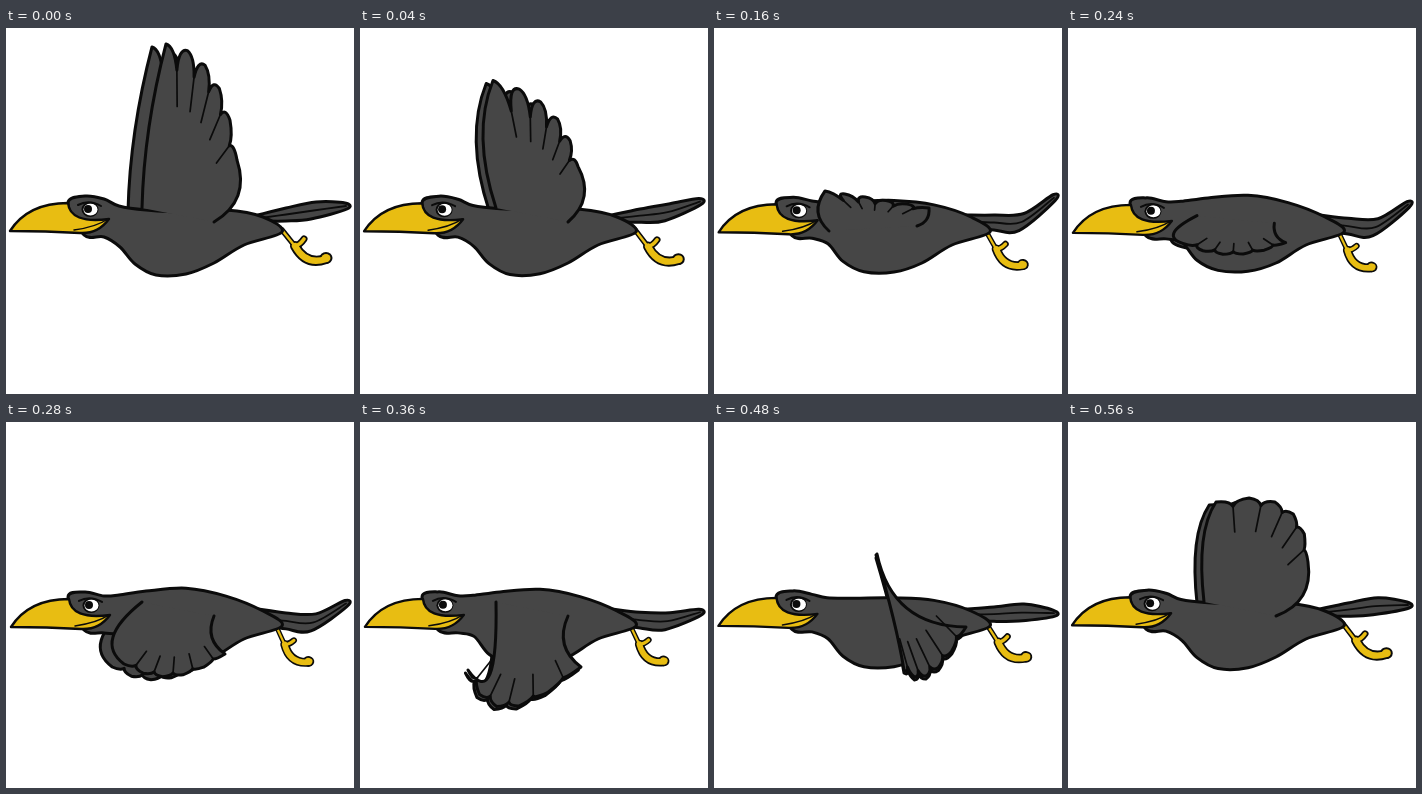
Recreate the animation shown at these times as an HTML page with a canvas. Size 348 by 366 pixels, loop 0.6 s.

```html
<!DOCTYPE html>
<html lang="en">
<head>
<meta charset="utf-8">
<title>Flying crow</title>
<style>
html, body { margin: 0; width: 100%; height: 100%; overflow: hidden; background: #fff; }
canvas { display: block; }
</style>
</head>
<body>
<canvas id="stage" width="348" height="366"></canvas>
<script>
const ctx = document.getElementById('stage').getContext('2d');
const STEPS = 15, STEP_MS = 40, FEATHERS = 6, TAU = 2 * Math.PI;
const PLUMAGE = '#464646', INK = '#0b0b0b', YELLOW = '#e8bd12';

// A wing runs front -> (lead) -> first tip -> (arch) -> last tip -> back.
const wingPose = (step, lead, first, arch, last, front = [136, 180], back = [208, 194]) =>
  ({ step, points: [front, lead, first, arch, last, back] });

const WING_POSES = [
  wingPose(0, [138, 100], [160, 16], [218, 22], [231, 132]),
  wingPose(2, [85, 112], [106, 89], [190, 115], [205, 145]),
  wingPose(4, [95, 185], [111, 163], [160, 170], [215, 180], [115, 203], [203, 198]),
  wingPose(7, [87, 219], [118, 242], [165, 272], [219, 232]),
  wingPose(9, [138, 290], [108, 248], [130, 325], [221, 245]),
  wingPose(10, [112, 270], [126, 340], [180, 385], [219, 285]),
  wingPose(12, [182, 200], [190, 248], [215, 275], [252, 205], [162, 133], [163, 132]),
  wingPose(13, [144, 130], [160, 101], [240, 95], [247, 180]),
  wingPose(14, [128, 110], [148, 80], [240, 60], [240, 140])
];

// x, y, and how far the point rises when the wings are down
const BODY = [
  [62, 175, 0], [79, 168, -2], [98, 171, -3], [113, 178, 5], [140, 182, 13], [180, 184, 18],
  [220, 182, 8], [257, 189, 0], [276, 204, 0], [238, 217, 0], [208, 235, 0], [180, 246, 3],
  [150, 247, 5], [129, 236, 4], [114, 219, 5], [98, 209, -2], [78, 207, -1]
];
const HEAD = {
  beak: new Path2D('M4 203Q22 175 62 175Q64 196 103 191Q92 206 74 205Q40 203 4 203Z'),
  mouth: new Path2D('M68 202Q90 199 102 191'),
  brow: new Path2D('M72 177Q83 171 95 178')
};
// Drawn from the hip
const LEG = {
  shin: new Path2D('M0 0L12 15'),
  claw: new Path2D('M13 16Q18 15 22 9'),
  foot: new Path2D('M13 16Q24 36 44 29')
};

const mix = (a, b, t) => a.map((v, i) => v + (b[i] - v) * t);

function alongQuad(a, c, b, t) {
  return mix(mix(a, c, t), mix(c, b, t), t);
}

// Smooth curve through the points.
function spline(points, closed = false) {
  const n = points.length, path = new Path2D();
  const at = i => points[closed ? (i + n) % n : Math.min(Math.max(i, 0), n - 1)];
  path.moveTo(...points[0]);
  for (let i = 0; i < (closed ? n : n - 1); i++) {
    const [a, p, q, b] = [i - 1, i, i + 1, i + 2].map(at);
    path.bezierCurveTo(p[0] + (q[0] - a[0]) / 6, p[1] + (q[1] - a[1]) / 6,
      q[0] - (b[0] - p[0]) / 6, q[1] - (b[1] - p[1]) / 6, ...q);
  }
  return path;
}

function ink(path, width = 3, color = INK) {
  ctx.lineWidth = width;
  ctx.strokeStyle = color;
  ctx.stroke(path);
}

function shape(path, fill = PLUMAGE, width = 3) {
  ctx.fillStyle = fill;
  ctx.fill(path);
  ink(path, width);
}

function disc(x, y, rx, ry, fill) {
  ctx.beginPath();
  ctx.ellipse(x, y, rx, ry, 0, 0, TAU);
  ctx.fillStyle = fill;
  ctx.fill();
}

function wingPoints(step) {
  const next = WING_POSES.find(pose => pose.step >= step);
  const from = WING_POSES.findLast(pose => pose.step <= step);
  const t = next === from ? 0 : (step - from.step) / (next.step - from.step);
  return from.points.map((p, i) => mix(p, next.points[i], t));
}

function wingPaths(step, phase) {
  const [front, lead, first, arch, last, back] = wingPoints(step);
  const root = mix(front, back, .5);
  const depth = .05 + .18 * Math.max(0, Math.sin(TAU * (phase + .07)));
  const outline = new Path2D(), creases = new Path2D();
  outline.moveTo(...front);
  outline.quadraticCurveTo(...lead, ...first);
  let tip = first;
  for (let i = 1; i < FEATHERS; i++) {
    const t = i / (FEATHERS - 1);
    const nextTip = alongQuad(first, arch, last, t);
    const notch = mix(mix(tip, nextTip, .5), root, depth * (1.2 - .6 * t));
    outline.quadraticCurveTo(...mix(tip, nextTip, .4), ...notch);
    outline.quadraticCurveTo(...mix(tip, nextTip, .6), ...nextTip);
    creases.moveTo(...notch);
    creases.lineTo(...mix(notch, root, .25));
    tip = nextTip;
  }
  const [mx, my] = mix(last, back, .5);
  outline.quadraticCurveTo(mx + .4 * (back[1] - last[1]), my - .4 * (back[0] - last[0]), ...back);
  return { outline, creases };
}

function drawTail(lift, phase) {
  const tipY = 182 - 12 * Math.sin(TAU * (phase + .04));
  const top = [[252, 187], [280, 180 + 11 * lift], [310, 174 + 18 * lift], [339, tipY - 4]];
  const under = [[258, 193 + 10 * lift], [280, 193 + 14 * lift], [305, 191 + 18 * lift], [341, tipY + 2]];
  shape(spline([...top, ...under.slice().reverse()]));
  ink(spline(top.map((p, i) => mix(p, under[i], .5))), 1.8);
}

function drawLeg(lift) {
  ctx.save();
  ctx.translate(276 - 5 * lift, 202 + 4 * lift);
  ctx.rotate(.25 * lift);
  ctx.scale(1 - .12 * lift, 1 - .12 * lift);
  ink(LEG.shin, 5.5);
  ink(LEG.claw, 7);
  ink(LEG.foot, 10);
  disc(44, 28, 6.5, 6, INK);
  ink(LEG.shin, 2.5, YELLOW);
  ink(LEG.claw, 3.6, YELLOW);
  ink(LEG.foot, 6.4, YELLOW);
  disc(44, 28, 4.5, 4, YELLOW);
  ctx.restore();
}

function drawHead(lift) {
  ctx.save();
  ctx.translate(lift, 2 * lift);
  shape(HEAD.beak, YELLOW, 2.4);
  ink(HEAD.mouth, 1.5);
  disc(84, 181.5, 8.5, 7.5, INK);
  disc(84.5, 181.5, 7, 6, '#fff');
  disc(82, 181, 4, 4, INK);
  ink(HEAD.brow, 2);
  ctx.restore();
}

function draw() {
  const step = Math.floor(performance.now() / STEP_MS) % STEPS;
  const phase = step / STEPS;
  const lift = Math.sin(Math.PI * phase) ** 1.5;
  const { outline, creases } = wingPaths(step, phase);

  ctx.fillStyle = '#fff';
  ctx.fillRect(0, 0, 348, 366);
  ctx.lineCap = ctx.lineJoin = 'round';

  // The far wing peeks out in front only near the top of the stroke.
  ctx.save();
  ctx.translate(-14 * Math.cos(TAU * phase) ** 8, 3);
  shape(outline);
  ctx.restore();

  drawTail(lift, phase);
  drawLeg(lift);
  shape(spline(BODY.map(([x, y, rise]) => [x, y - rise * lift]), true));
  drawHead(lift);
  shape(outline);
  ink(creases, 1.7);
  requestAnimationFrame(draw);
}
draw();
</script>
</body>
</html>
```
